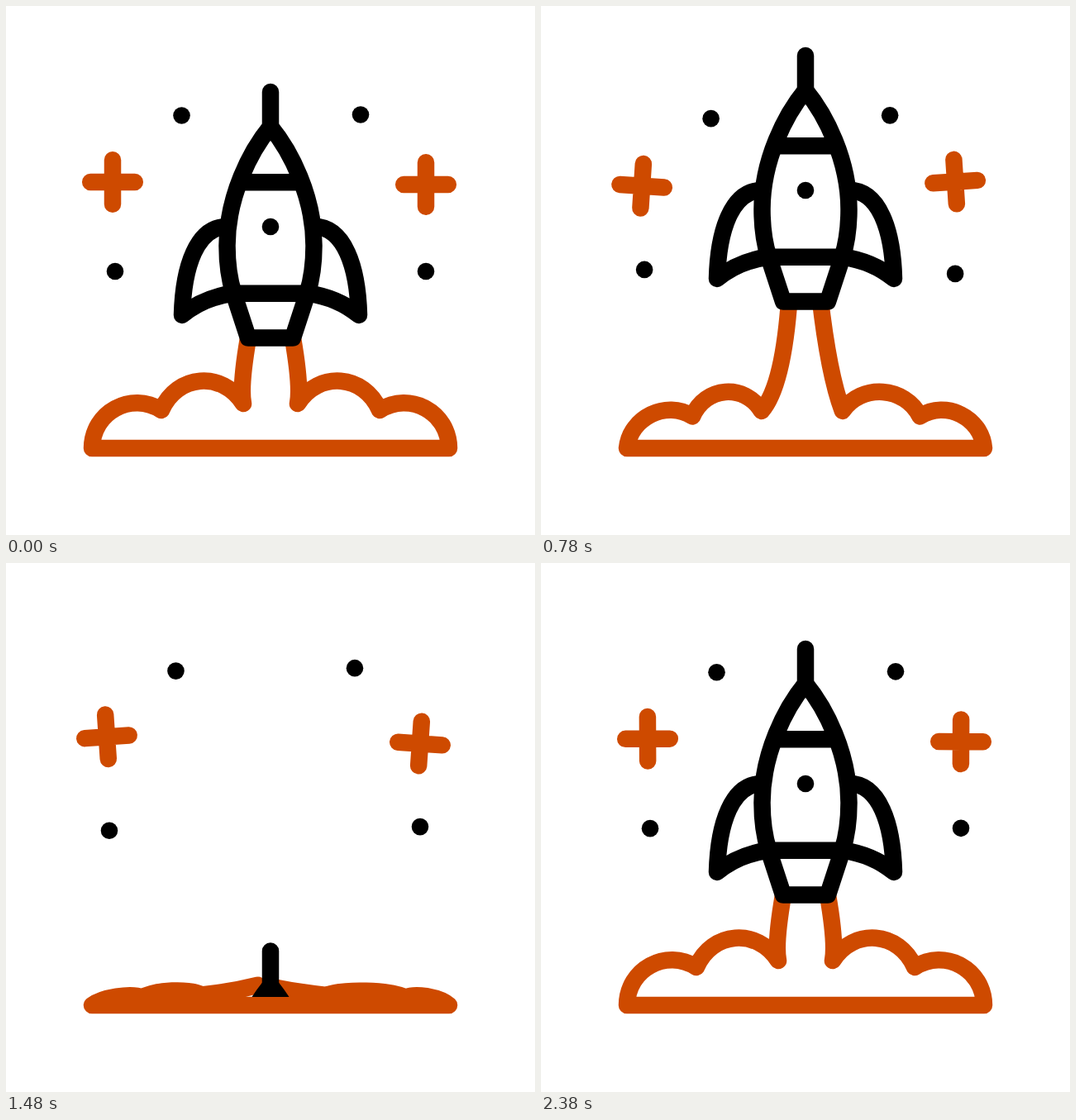
An HTML page for the animation above (2400 ms loop, 640 px wide and 640 px high).

```html
<!DOCTYPE html>
<html lang="en">
<head>
<meta charset="utf-8">
<title>Rocket launch</title>
<style>
  html, body { margin: 0; width: 100%; height: 100%; overflow: hidden; background: #fff; }
  svg { display: block; width: 100%; height: 100%; }
  .line { fill: none; stroke-width: 20.5; stroke-linecap: round; stroke-linejoin: round; }
  .ink { stroke: #000; }
  .fire { stroke: #ce4a00; }
  .solid { fill: #fff; }
</style>
</head>
<body>
<svg viewBox="0 0 640 640">
  <defs>
    <clipPath id="ground"><rect width="640" height="525"/></clipPath>
    <path id="fin" class="line ink solid" d="M267 267C231 267 214.5 315 213 374Q238 353 275 347.5"/>
  </defs>
  <g id="sky"></g>
  <path id="cloud" class="line fire"/>
  <g clip-path="url(#ground)">
    <g id="rocket">
      <use href="#fin"/>
      <use href="#fin" transform="matrix(-1 0 0 1 640 0)"/>
      <path class="line ink solid" d="M320 146C296 175 267.5 230 267.5 290C267.5 312 270.5 332 275.5 348L293 401.5H347L364.5 348C369.5 332 372.5 312 372.5 290C372.5 230 344 175 320 146Z"/>
      <path class="line ink" d="M320 104V146M285 213.2H355M275.5 347.7H364.5"/>
      <circle cx="320" cy="267" r="10.3"/>
    </g>
  </g>
</svg>
<script>
const LOOP = 2400;
const BASE = 535;
const $ = id => document.getElementById(id);
const mix = (a, b, u) => a + (b - a) * u;
const clamp = u => Math.min(1, Math.max(0, u));
const smooth = u => u * u * (3 - 2 * u);
const same = u => u;

// Every sky item circles slowly: swing is its sine part, lift its cosine part.
const wave = (a, swing, lift) => swing * Math.sin(a) + lift * (1 - Math.cos(a));
const SKY = [
  { x: 129, y: 213, swing: 4.8, lift: 0.3, turn: 1 },
  { x: 508, y: 216, swing: -3.8, lift: 0, turn: -1 },
  { x: 212.5, y: 132.5, swing: 3.6, lift: 0.3 },
  { x: 429, y: 131.5, swing: 3.1, lift: -1.3 },
  { x: 132, y: 321, swing: -3, lift: 0.4 },
  { x: 508, y: 321, swing: 3.1, lift: 0.1 }
];

// Poses of the smoke: hump height, then the key points of both sides.
const side = (valley, tip, bend, top) => ({ valley, tip, bend, top });
const REST = {
  rise: 38,
  left: side([188, 489], [287, 481], [283, 460], [293, 402]),
  right: side([452, 489], [353, 481], [357, 460], [347, 402])
};
const TALL = {
  rise: 12.5,
  left: side([168, 520], [246, 518], [302, 460], [311.5, 261.5]),
  right: side([479, 520], [377, 518], [337, 400], [318, 263])
};
const FLAT = {
  rise: 7.2,
  left: side([165, 526], [236, 523], [272, 520], [305, 512.5]),
  right: side([484, 526], [388, 523.5], [352, 520], [318, 514])
};
const STEPS = [
  { from: 520, to: 1160, a: REST, b: TALL, ease: u => u ** 1.58, spread: Math.sqrt },
  { from: 1160, to: 1440, a: TALL, b: FLAT, ease: smooth, spread: same },
  { from: 1440, to: 1980, a: FLAT, b: REST, ease: smooth, spread: same }
];

// Round hump over the line from p to q.
function hump([px, py], [qx, qy], rise) {
  const dx = qx - px, dy = qy - py;
  const k = Math.sign(dx) * rise / Math.hypot(dx, dy);
  const at = u => [px + u * dx + k * dy, py + u * dy - k * dx];
  return `C${at(0.22)} ${at(0.78)} ${[qx, qy]}`;
}

function cloudPath(t) {
  const { from, to, a, b, ease, spread } = STEPS.find(s => t < s.to) || STEPS[2];
  const u = clamp((t - from) / (to - from)), p = ease(u);
  const rise = mix(a.rise, b.rise, p);
  const sway = 2 * Math.sin(Math.PI * clamp(t / 920));
  const half = (name, x) => {
    const point = (key, ux, uy, shift = 0) => [
      mix(a[name][key][0], b[name][key][0], ux) + shift,
      mix(a[name][key][1], b[name][key][1], uy)
    ];
    const corner = [x, BASE];
    const valley = point("valley", p, p);
    const tip = point("tip", spread(p), p);
    const bend = point("bend", spread(p), p, sway);
    const top = point("top", smooth(u), smooth(u), sway);
    return `M${corner}${hump(corner, valley, rise)}${hump(valley, tip, rise * 1.1)}Q${bend} ${top}`;
  };
  return `M104 ${BASE}H536${half("left", 104)}${half("right", 536)}`;
}

// Accelerates away, then rises again from below the ground.
function rocketY(t) {
  if (t < 1200) return -44 * Math.max(0, (t - 380) / 400) ** 3.5;
  return 452 * (1 - smooth(clamp((t - 1200) / 1000)));
}

for (const item of SKY) {
  const tag = item.turn ? "path" : "circle";
  item.el = $("sky").appendChild(document.createElementNS("http://www.w3.org/2000/svg", tag));
  if (item.turn) {
    item.el.setAttribute("class", "line fire");
    item.el.setAttribute("d", "M-26.8 0H26.8M0 -26.8V26.8");
  } else {
    item.el.setAttribute("r", 10.3);
  }
}

function draw(now) {
  const t = now % LOOP;
  const angle = 2 * Math.PI * t / LOOP;
  const dx = wave(angle, -0.7, -4.3), tilt = wave(angle, 4.8, -0.4);
  for (const { el, x, y, swing, lift, turn = 0 } of SKY) {
    el.setAttribute("transform",
      `translate(${x + dx} ${y + wave(angle, swing, lift)}) rotate(${turn * tilt})`);
  }
  $("cloud").setAttribute("d", cloudPath(t));
  $("rocket").setAttribute("transform", `translate(0 ${rocketY(t)})`);
}

let start;
function tick(now) {
  start ??= now;
  draw(Math.max(0, now - start));
  requestAnimationFrame(tick);
}
draw(0);
requestAnimationFrame(tick);
</script>
</body>
</html>
```
